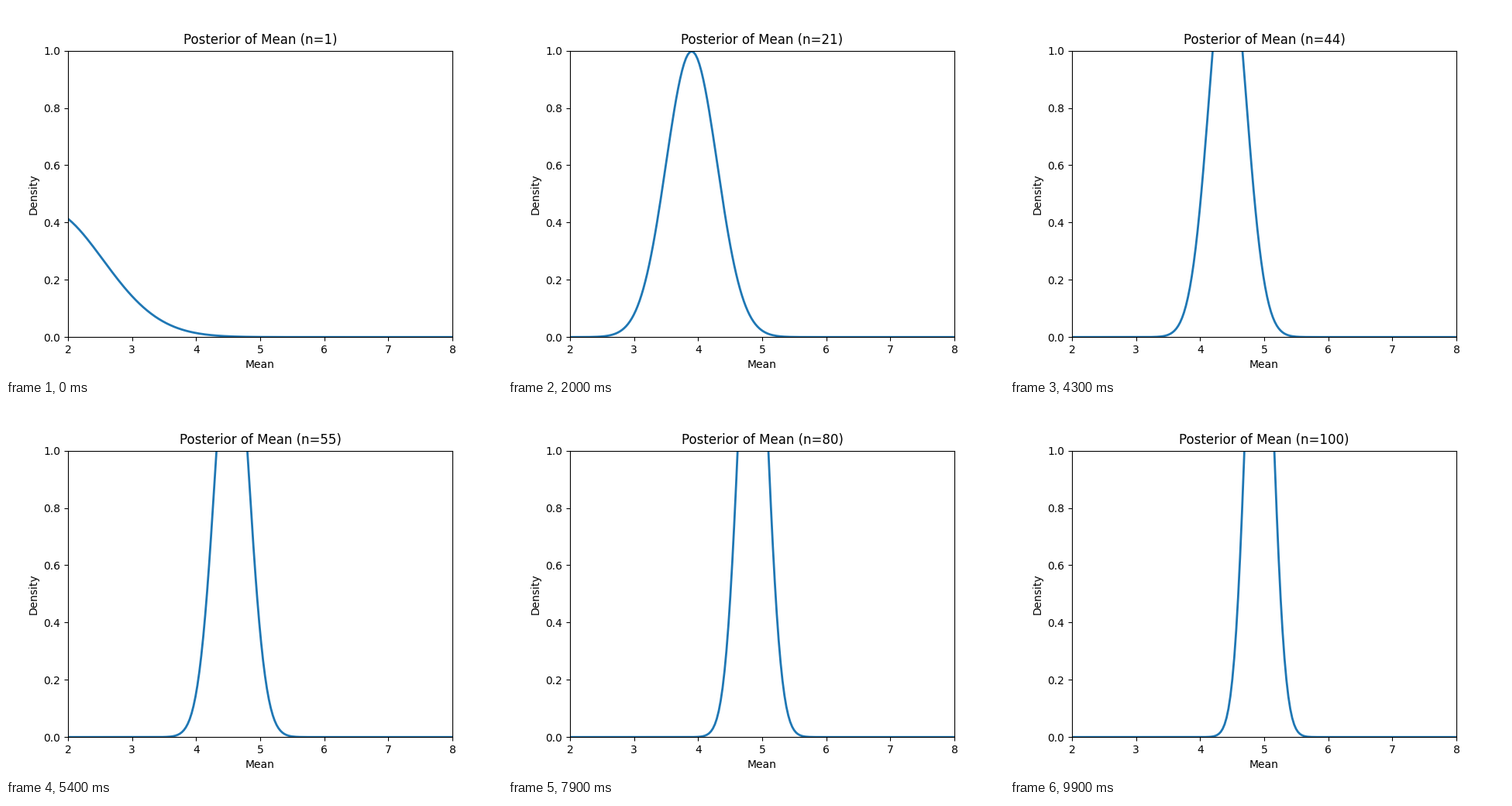
Recreate the animation shown at these times as a matplotlib script. Size 640 by 480 pixels, loop 10 s.

```python
import numpy as np
import matplotlib.pyplot as plt
from matplotlib.animation import FuncAnimation

FRAMES = 100
INTERVAL = 100  # ms

# Normal data with known spread, and a standard normal prior on the mean
TRUE_MEAN, SIGMA = 5, 2
PRIOR_MEAN, PRIOR_VAR = 0, 1

np.random.seed(1)
data = np.random.normal(TRUE_MEAN, SIGMA, FRAMES)
x = np.linspace(2, 8, 200)


def posterior(n):
    """Density over x of the mean after n observations."""
    var = 1 / (1 / PRIOR_VAR + n / SIGMA**2)
    mean = var * (PRIOR_MEAN / PRIOR_VAR + data[:n].sum() / SIGMA**2)
    return np.exp(-((x - mean) ** 2) / (2 * var)) / np.sqrt(2 * np.pi * var)


fig, ax = plt.subplots(figsize=(6.4, 4.8), dpi=100)
ax.set_xlim(2, 8)
ax.set_ylim(0, 1)
ax.set_xlabel("Mean")
ax.set_ylabel("Density")
line, = ax.plot([], [], lw=2)


def update(frame):
    n = frame + 1
    line.set_data(x, posterior(n))
    ax.set_title(f"Posterior of Mean (n={n})")
    return line,


anim = FuncAnimation(fig, update, frames=FRAMES, interval=INTERVAL,
                     init_func=lambda: update(0), repeat=True, repeat_delay=0)
plt.show()
```
